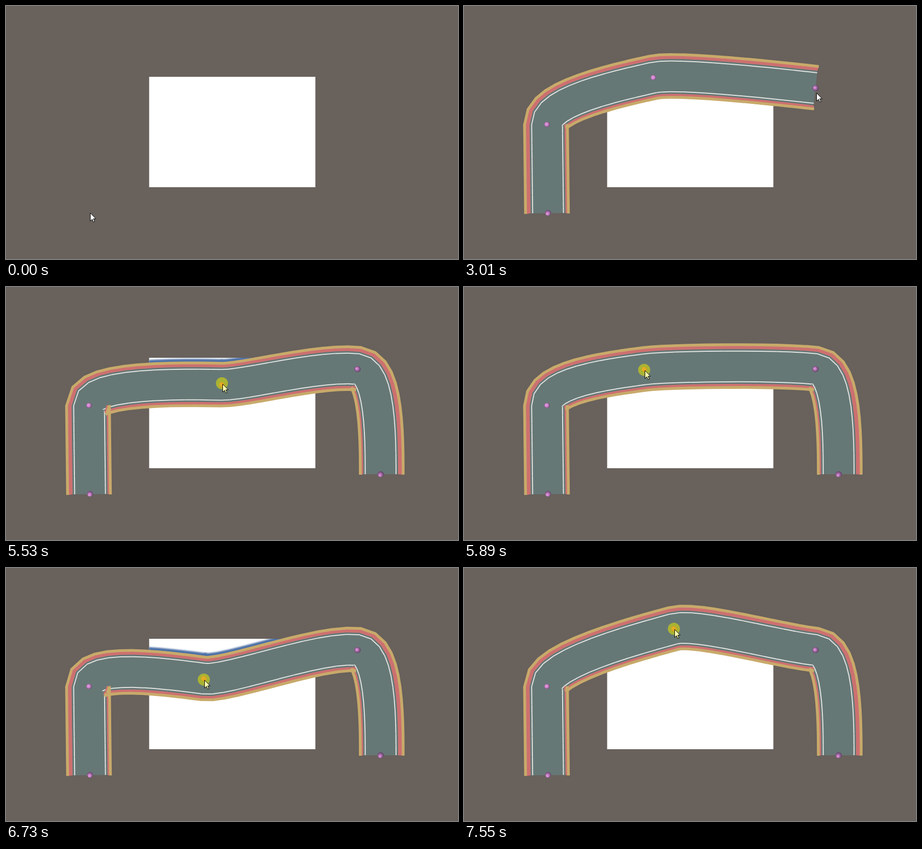
Recreate the animation shown at these times as an HTML page with a canvas. Size 898x504 px, loop 7.65 s.

```html
<!DOCTYPE html>
<html lang="en">
<head>
<meta charset="utf-8">
<title>Road spline editor</title>
<style>
  html, body { margin: 0; width: 100%; height: 100%; overflow: hidden; background: #68615c; }
  canvas { display: block; }
</style>
</head>
<body>
<canvas id="stage" width="898" height="504"></canvas>
<script>
const ctx = document.getElementById('stage').getContext('2d');
const LOOP = 7650, DRAG_START = 4790, LAG = 10;
const CENTER = [449, 252];
const OUT = 46, IN = 75, STEPS = 12, TOP = 1.0075;
const GOLD = '#c8aa6a', PINK = '#cd7070', ROAD = '#667876', LINE = '#e2e6e3';

const REST = [[167, 412], [165, 236], [376.3, 142.7], [698.3, 163.4], [744.3, 373]];
const BORN = [130, 1150, 1990, 2780, 3610];

// Pointer moves: time, x, y
const MOVES = [
  [0, 167, 412], [330, 167, 412], [790, 165, 236], [1330, 165, 236],
  [1660, 376, 143], [2090, 376, 143], [2450, 698, 163], [2960, 698, 163],
  [3350, 744, 373], [4020, 744, 373], [4460, 392, 160], [4690, 376, 143],
  [DRAG_START, 376, 143]
];
const DRAG = [
  [DRAG_START, 376, 143], [5080, 386, 168], [5380, 416, 200], [5480, 425, 202],
  [5530, 429, 192], [5600, 426, 160], [5690, 405, 128], [5820, 364, 157],
  [5890, 358, 165], [5950, 358, 173], [6130, 378, 250], [6300, 412, 196],
  [6470, 410, 156], [6650, 399, 206], [6730, 393, 222], [6990, 396, 266],
  [7240, 396, 266], [7550, 417, 121], [LOOP, 417, 121]
];

const lerp = (a, b, f) => a + (b - a) * f;
const unit = (x, y) => { const n = Math.hypot(x, y) || 1; return [x / n, y / n]; };
const along = (p, d, s) => [p[0] + d[0] * s, p[1] + d[1] * s];
const still = (a, b) => a[1] === b[1] && a[2] === b[2];

function findKey(keys, t) {
  let i = 0;
  while (i < keys.length - 2 && t >= keys[i + 1][0]) i++;
  return i;
}

function velocity(keys, i) {
  const a = keys[i - 1], b = keys[i], c = keys[i + 1];
  if (!a || !c || still(a, b) || still(b, c)) return [0, 0];
  return [1, 2].map(k => (c[k] - a[k]) / (c[0] - a[0]));
}

function dragAt(t) {
  t = Math.max(t, DRAG_START);
  const i = findKey(DRAG, t), a = DRAG[i], b = DRAG[i + 1];
  const span = b[0] - a[0], s = (t - a[0]) / span, r = 1 - s;
  const va = velocity(DRAG, i), vb = velocity(DRAG, i + 1);
  return [0, 1].map(k =>
    (1 + 2 * s) * r * r * a[k + 1] + s * r * r * span * va[k] +
    s * s * (3 - 2 * s) * b[k + 1] - s * s * r * span * vb[k]);
}

function pointerAt(t) {
  if (t >= DRAG_START) return dragAt(t);
  const i = findKey(MOVES, t), a = MOVES[i], b = MOVES[i + 1];
  const s = (t - a[0]) / (b[0] - a[0]), f = s * s * (3 - 2 * s);
  return [lerp(a[1], b[1], f), lerp(a[2], b[2], f)];
}

function heading(nodes, dirs, i) {
  const from = along(nodes[i - 1], dirs[i - 1], OUT);
  return unit(nodes[i][0] - from[0], nodes[i][1] - from[1]);
}

const REST_DIRS = [unit(REST[1][0] - REST[0][0], REST[1][1] - REST[0][1])];
for (let i = 1; i < REST.length; i++) REST_DIRS[i] = heading(REST, REST_DIRS, i);

// Samples of one cubic segment, each with position and unit direction
function sample(p, dp, q, dq) {
  const c = along(p, dp, OUT), e = along(q, dq, -IN), list = [];
  for (let i = 0; i <= STEPS; i++) {
    const t = i / STEPS, r = 1 - t;
    const pos = [0, 1].map(k =>
      r * r * r * p[k] + 3 * r * r * t * c[k] + 3 * r * t * t * e[k] + t * t * t * q[k]);
    const d = [0, 1].map(k =>
      r * r * (c[k] - p[k]) + 2 * r * t * (e[k] - c[k]) + t * t * (q[k] - e[k]));
    list.push({ pos, dir: unit(d[0], d[1]) });
  }
  return list;
}

// Point beside the curve; raised parts are scaled away from the stage centre
function beside(s, off, scale) {
  const p = [s.pos[0] - s.dir[1] * off, s.pos[1] + s.dir[0] * off];
  return p.map((v, k) => CENTER[k] + (v - CENTER[k]) * scale);
}

function quad(a, b, color, o1, k1, o2, k2) {
  const d = unit(b.pos[0] - a.pos[0], b.pos[1] - a.pos[1]);
  const pts = [along(beside(a, o1, k1), d, -0.6), beside(b, o1, k1),
               beside(b, o2, k2), along(beside(a, o2, k2), d, -0.6)];
  ctx.fillStyle = color;
  ctx.beginPath();
  pts.forEach(p => ctx.lineTo(p[0], p[1]));
  ctx.fill();
}

const LAYERS = [
  (a, b) => {
    quad(a, b, ROAD, -36, 1, 36, 1);
    for (const s of [-1, 1]) quad(a, b, LINE, s * 29.6, 1, s * 31.6, 1);
  },
  (a, b) => { for (const s of [-1, 1]) quad(a, b, PINK, s * 34.7, 1, s * 40.5, TOP); },
  (a, b) => { for (const s of [-1, 1]) quad(a, b, GOLD, s * 39.5, TOP, s * 45, TOP); }
];

function drawShadow(segments) {
  ctx.save();
  ctx.beginPath();
  ctx.rect(284.4, 141, 330.2, 220);
  ctx.clip();
  ctx.filter = 'blur(1.4px)';
  ctx.strokeStyle = '#4c70a6';
  ctx.lineWidth = 90;
  for (const seg of segments) {
    ctx.beginPath();
    seg.forEach(s => ctx.lineTo(s.pos[0], s.pos[1] - 6));
    ctx.stroke();
  }
  ctx.restore();
}

function drawRoad(segments) {
  for (const layer of LAYERS)
    for (const seg of segments)
      for (let i = 0; i < STEPS; i++) layer(seg[i], seg[i + 1]);
}

// Balls are darker the further they lie from the light
function drawBall([x, y], hot) {
  const shade = Math.min(1, Math.hypot(x - 300, y - 170) / 400);
  const r = 5.2 + shade * 1.2;
  const g = ctx.createRadialGradient(x - 2, y + (y > 300 ? 3 : -1), 0.5, x, y, r + 1);
  const tones = hot ? ['#f0785a', '#e8604e', '#b04838'] : ['#e49ae0', '#cb84ca', '#46324e'];
  const stops = [0, hot ? 0.5 : 0.6 - shade * 0.4, 1];
  tones.forEach((c, i) => g.addColorStop(stops[i], c));
  ctx.fillStyle = g;
  ctx.beginPath();
  ctx.ellipse(x, y, r, r * 0.94, 0, 0, 7);
  ctx.fill();
}

const ARROW = new Path2D('M.5 .5V16.3L4.2 12.8L6.8 18.5L9.2 17.4L6.7 11.8H11.6Z');

function drawPointer([x, y], pressed) {
  if (pressed) {
    ctx.fillStyle = 'rgba(222,223,0,.57)';
    ctx.beginPath();
    ctx.arc(x, y, 12, 0, 7);
    ctx.fill();
  }
  const nudge = pressed ? 1 : 0;
  ctx.save();
  ctx.translate(Math.round(x) + nudge, Math.round(y) + nudge);
  ctx.fillStyle = pressed ? '#ffffb0' : '#fff';
  ctx.strokeStyle = '#000';
  ctx.lineWidth = 1;
  ctx.fill(ARROW);
  ctx.stroke(ARROW);
  ctx.restore();
}

function draw(t) {
  const dragging = t >= DRAG_START, pointer = pointerAt(t);
  const nodes = REST.slice(), dirs = REST_DIRS.slice();
  if (dragging) {
    nodes[2] = dragAt(t - LAG);
    dirs[2] = heading(nodes, dirs, 2);
  }
  const count = BORN.filter(b => t >= b).length;
  const segments = [];
  for (let i = 1; i < count; i++)
    segments.push(sample(nodes[i - 1], dirs[i - 1], nodes[i], dirs[i]));

  ctx.fillStyle = '#68615c';
  ctx.fillRect(0, 0, 898, 504);
  ctx.fillStyle = '#fff';
  ctx.fillRect(284.4, 141, 330.2, 220);
  drawShadow(segments);
  drawRoad(segments);
  for (let i = 0; i < count; i++) {
    const near = Math.hypot(pointer[0] - nodes[i][0], pointer[1] - nodes[i][1]) < 7;
    drawBall(nodes[i], dragging ? i === 2 : near && t >= BORN[i] + 50);
  }
  drawPointer(pointer, dragging);
}

const start = performance.now();
function tick() {
  draw((performance.now() - start) % LOOP);
  requestAnimationFrame(tick);
}
tick();
</script>
</body>
</html>
```
